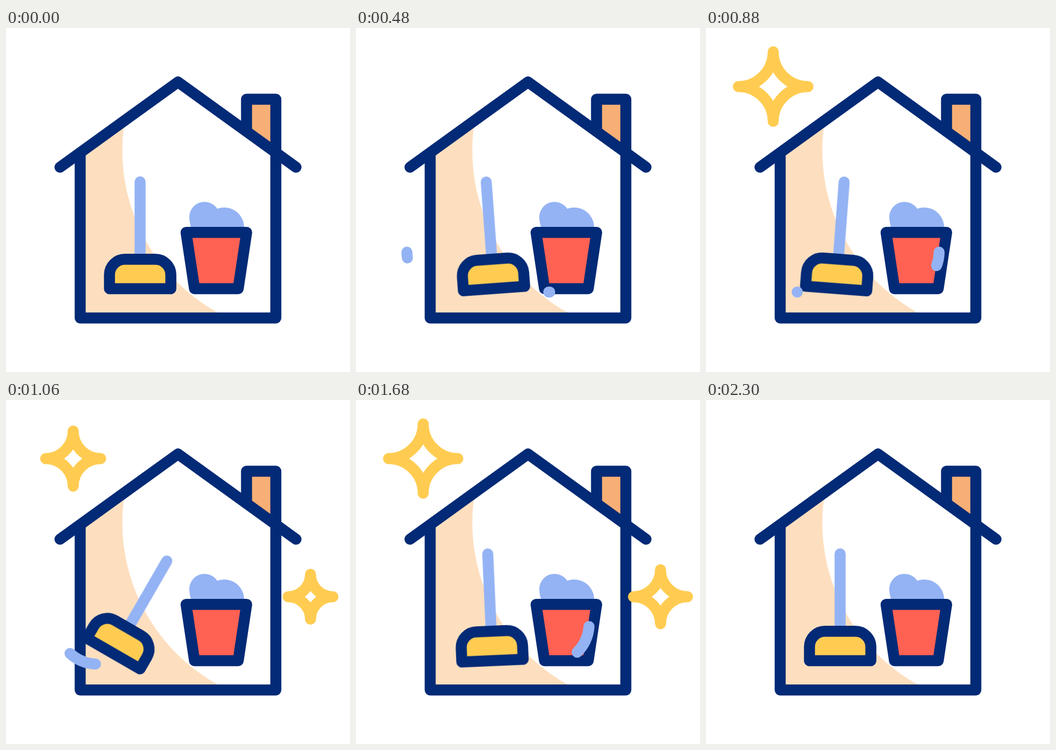
An HTML page for the animation above (2400 ms loop, 640 by 640 pixels).

```html
<!DOCTYPE html>
<html lang="en">
<head>
<meta charset="utf-8">
<title>House cleaning</title>
<style>
  :root {
    --navy: #032a76;
    --blue: #94b3f4;
    --yellow: #ffcc51;
    --smooth: cubic-bezier(.333, 0, .667, 1);
  }
  html, body { margin: 0; width: 100%; height: 100%; overflow: hidden; background: #fff; }
  svg { display: block; width: 100%; height: 100%; }

  .line { fill: none; stroke: var(--navy); stroke-width: 20.5; stroke-linecap: round; stroke-linejoin: round; }
  .blue { stroke: var(--blue); }

  .broom {
    transform-origin: 249.6px 385.6px;
    animation: swing 2400ms var(--smooth) infinite;
  }
  @keyframes swing {
    0%, 72%, 100% { transform: rotate(0deg); }
    11%, 44.25%   { transform: rotate(30deg); }
    27.55%, 61%   { transform: rotate(-30deg); }
  }

  /* Each trail grows from its start, then its tail catches up. */
  .trail {
    opacity: 0;
    stroke-dasharray: 0 200;
    animation: show 2400ms step-end infinite, length 2400ms infinite, tail 2400ms var(--smooth) infinite;
    animation-delay: var(--at);
  }
  @keyframes show {
    0% { opacity: 1; }
    23%, 100% { opacity: 0; }
  }
  @keyframes length {
    0%      { stroke-dasharray: 0 200; animation-timing-function: cubic-bezier(.333, 0, .667, .446); }
    6.333%  { stroke-dasharray: 29.1 200; animation-timing-function: cubic-bezier(.333, .667, .667, 1); }
    11.5%   { stroke-dasharray: 48.8 200; animation-timing-function: cubic-bezier(.333, 0, .667, .333); }
    16.667% { stroke-dasharray: 29.1 200; animation-timing-function: cubic-bezier(.333, .554, .667, 1); }
    23%, 100% { stroke-dasharray: 0 200; }
  }
  @keyframes tail {
    0%, 6.333% { stroke-dashoffset: 0; }
    23%, 100%  { stroke-dashoffset: -90; }
  }

  .star {
    stroke: var(--yellow);
    visibility: hidden;
    animation: twinkle 2400ms var(--smooth) infinite;
    animation-delay: var(--at);
  }
  @keyframes twinkle {
    0%, 27.08%, 84.9%, 100% {
      visibility: hidden;
      d: path("M0 -.1A.1 .1 0 0 0 .1 0A.1 .1 0 0 0 0 .1A.1 .1 0 0 0 -.1 0A.1 .1 0 0 0 0 -.1Z");
    }
    37.9%, 72% {
      visibility: visible;
      d: path("M0 -67A67 67 0 0 0 67 0A67 67 0 0 0 0 67A67 67 0 0 0 -67 0A67 67 0 0 0 0 -67Z");
    }
    45.2%, 64.04% {
      visibility: visible;
      d: path("M0 -50.3A50.3 50.3 0 0 0 50.3 0A50.3 50.3 0 0 0 0 50.3A50.3 50.3 0 0 0 -50.3 0A50.3 50.3 0 0 0 0 -50.3Z");
    }
  }
</style>
</head>
<body>
<svg viewBox="0 0 640 640">
  <!-- house -->
  <path fill="#fddfbf" d="M138 232L221 172A345 345 0 0 0 414.3 540H138Z"/>
  <path fill="#f7af75" d="M447.5 132.5H502V232L447.5 192.5Z"/>
  <path class="line" d="M138 234V539.5H502V132.5H447.5V190"/>
  <path class="line" d="M100.5 259L320 100.5L539.5 259"/>

  <!-- bucket -->
  <path fill="var(--blue)" d="M346 376Q341 363 341 351A28.3 28.3 0 0 1 393 336.3A37 37 0 0 1 443 370V376Z"/>
  <path class="line" style="fill:#ff6152" d="M335 380.3H447.7L432 485H350.7Z"/>

  <!-- broom -->
  <g class="broom">
    <path class="line blue" d="M249.5 286.3V430"/>
    <path class="line" style="fill:var(--yellow)" d="M192.5 485V459A28.8 28.8 0 0 1 221.3 430.3H277.9A28.8 28.8 0 0 1 306.7 459V485Z"/>
  </g>

  <!-- swing trails -->
  <path class="line blue trail" style="--at:4ms" pathLength="90" d="M170 491.3A75.5 75.5 0 0 1 94.7 417"/>
  <path class="line blue trail" style="--at:450ms" pathLength="90" d="M358.5 491.3A75.7 75.7 0 0 0 433.7 417"/>
  <path class="line blue trail" style="--at:867ms" pathLength="90" d="M170 491.3A75.5 75.5 0 0 1 94.7 417"/>
  <path class="line blue trail" style="--at:1328ms" pathLength="90" d="M358.5 491.3A75.7 75.7 0 0 0 433.7 417"/>

  <!-- sparkles -->
  <g transform="translate(125 109)"><path class="line star" style="--at:0ms"/></g>
  <g transform="translate(566.5 366)"><path class="line star" style="--at:-2140ms"/></g>
</svg>
</body>
</html>
```
